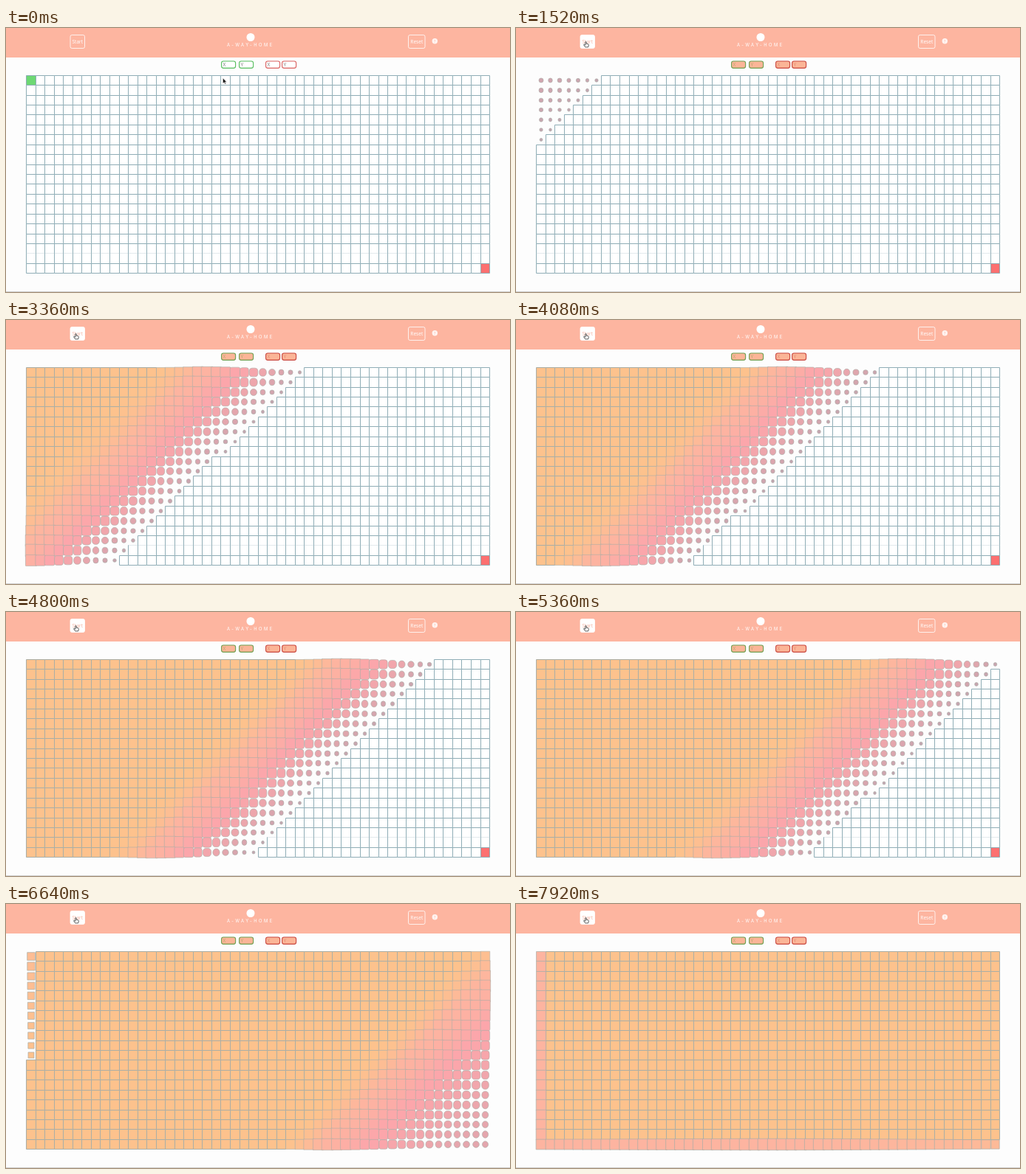
Animation, 682 px wide and 358 px high, one loop 8000 ms. Source, as an HTML page with a canvas:

```html
<!DOCTYPE html>
<html lang="en">
<head>
<meta charset="utf-8">
<title>Path finder</title>
<style>
  html, body { margin: 0; width: 100%; height: 100%; overflow: hidden; background: #fdfdfd; }
  canvas, svg { position: absolute; left: 0; top: 0; width: 682px; height: 358px; }
  text { font-family: "Open Sans", "Noto Sans", sans-serif; font-size: 6.6px; }
  .btn rect { fill: none; stroke: #fff; stroke-width: .8; }
  .btn text { fill: #fff; text-anchor: middle; }
  .hover #start rect { fill: #fff; }
  .hover #start text { fill: #f6b3a2; }
  .field rect { fill: #fff; stroke-width: 1.1; }
  .field text { fill: #777; }
  .from rect { stroke: #55bd5c; }
  .to rect { stroke: #d9605f; }
  .running .field rect { fill: #fbb597; }
  .running .from rect { stroke: #6f9f50; }
  .running .to rect { stroke: #c9473f; }
  .running .from text { fill: #b9a96c; }
  .running .to text { fill: #e08a72; }
  #hand, .hover #arrow { display: none; }
  .hover #hand { display: inline; }
</style>
</head>
<body>
<canvas id="grid"></canvas>
<svg id="ui" viewBox="0 0 682 358">
  <rect width="682" height="40" fill="#fdb5a0"/>
  <rect y="357" width="682" height="1" fill="#d2d2d2"/>
  <g id="start" class="btn">
    <rect x="87" y="9.5" width="19.5" height="18" rx="2.2"/>
    <text x="96.8" y="20.8">Start</text>
  </g>
  <g class="btn">
    <rect x="544.5" y="9.5" width="22.5" height="18" rx="2.2"/>
    <text x="555.8" y="20.8">Reset</text>
  </g>
  <circle cx="331" cy="12.5" r="5.5" fill="#fff"/>
  <text x="299" y="25.3" fill="#fff" style="font-family:Inter,sans-serif;font-size:5.8px;letter-spacing:2.5px">A-WAY-HOME</text>
  <circle cx="580.3" cy="17.8" r="3.7" fill="#fff" fill-opacity=".85"/>
  <text x="580.3" y="19.9" text-anchor="middle" fill="#fdb5a0" style="font-size:5.5px">?</text>
  <g id="fields"></g>
  <g id="cursor">
    <path id="arrow" d="M0 0V7.2L1.7 5.6L2.8 8.1L3.9 7.6L2.8 5.2H5Z" fill="#111" stroke="#fff" stroke-width=".4"/>
    <path id="hand" d="M-.6 -2.6q.7-.8 1.3 0v2.4l2.6.7q.8.3.6 1.3l-.7 2.6h-4l-2.1-3q0-.9 1-.6l1.3 1Z" fill="#fff" stroke="#333" stroke-width=".8"/>
  </g>
</svg>
<script>
const LOOP = 8000, STEP = 80, COLS = 50, ROWS = 20, LIFE = 1500;
const VISIT_START = 1385, VISIT_GAP = 4.95;
const PATH_START = 6461, PATH_GAP = 17;
const HOVER_AT = 800, RUN_AT = 1280;

const LINE = '#8fadb6', DONE_LINE = '#a9aea6';
const MAUVE = [192, 165, 176], PINK = [252, 166, 171], SALMON = [253, 180, 160], ORANGE = [253, 194, 141];

const $ = id => document.getElementById(id);
const ui = $('ui'), cursor = $('cursor'), canvas = $('grid');
const ctx = canvas.getContext('2d');
const dpr = window.devicePixelRatio || 1;
canvas.width = 682 * dpr;
canvas.height = 358 * dpr;

$('fields').innerHTML = [[291, 'X', 'from'], [315, 'Y', 'from'], [351, 'X', 'to'], [373, 'Y', 'to']]
  .map(([x, label, kind]) => `<g class="field ${kind}">
    <rect x="${x + .6}" y="45" width="19" height="9.4" rx="2.6"/>
    <text x="${x + 2.4}" y="52.2">${label}</text></g>`).join('');

const edgeX = c => Math.floor(27.6 + 12.54 * c) + .5;
const edgeY = r => Math.floor(64.3 + 13.42 * r) + .5;
const mix = (a, b, p) => a + (b - a) * p;
const rgb = (a, b, p) => `rgb(${a.map((v, i) => Math.round(mix(v, b[i], p))).join()})`;
const clamp = v => Math.max(0, Math.min(1, v));

// CSS ease-out: cubic-bezier(0, 0, .58, 1)
function easeOut(x) {
  if (x <= 0 || x >= 1) return clamp(x);
  let lo = 0, hi = 1;
  for (let i = 0; i < 16; i++) {
    const s = (lo + hi) / 2;
    if (1.74 * (1 - s) * s * s + s * s * s < x) lo = s; else hi = s;
  }
  return 3 * (1 - lo) * lo * lo + lo * lo * lo;
}
const phase = (p, from, to) => easeOut((p - from) / (to - from));

const cells = [];
for (let r = 0; r < ROWS; r++) {
  for (let c = 0; c < COLS; c++) {
    const x = edgeX(c), y = edgeY(r);
    const onPath = c === 0 || r === ROWS - 1;
    cells.push({ r, c, x, y, w: edgeX(c + 1) - x, h: edgeY(r + 1) - y,
      path: onPath ? PATH_START + (r + c) * PATH_GAP : Infinity });
  }
}
// Breadth-first order: by distance, then from the top row down
[...cells].sort((a, b) => a.r + a.c - b.r - b.c || a.r - b.r)
  .forEach((cell, i) => { cell.visit = VISIT_START + i * VISIT_GAP; });

function box(cell, fill, line, scale = 1, round = 0, width = 1) {
  const w = cell.w * scale, h = cell.h * scale;
  const x = cell.x + (cell.w - w) / 2, y = cell.y + (cell.h - h) / 2;
  const k = Math.min(round, .5);
  ctx.beginPath();
  if (k > 0) ctx.roundRect(x, y, w, h, { x: w * k, y: h * k });
  else ctx.rect(x, y, w, h);
  ctx.fillStyle = fill;
  ctx.fill();
  ctx.strokeStyle = line;
  ctx.lineWidth = width;
  ctx.stroke();
}

function drawVisit(cell, p) {
  const fill = p < .5 ? rgb(MAUVE, PINK, phase(p, 0, .5))
    : p < .75 ? rgb(PINK, SALMON, phase(p, .5, .75))
    : rgb(SALMON, ORANGE, phase(p, .75, 1));
  const grow = phase(p, 0, .75);
  const scale = p < .75 ? mix(.3, 1.2, grow) : mix(1.2, 1, phase(p, .75, 1));
  box(cell, fill, DONE_LINE, scale, 1 - grow, .6);
}

function drawPath(cell, p) {
  const grow = phase(p, 0, .5);
  const scale = p < .5 ? mix(.6, 1.2, grow) : mix(1.2, 1, phase(p, .5, 1));
  box(cell, rgb(ORANGE, SALMON, grow), DONE_LINE, scale, 0, .7);
}

function drawIdle(cell) {
  const { r, c, x, y, w } = cell;
  const fill = r + c === 0 ? '#6dd873' : r + c === ROWS + COLS - 2 ? '#fd7070' : '#fff';
  box(cell, fill, LINE);
  if (r === 18) {
    ctx.fillStyle = 'rgba(255,255,255,.75)';
    ctx.fillRect(x + .5, y - .5, w - 1, 1);
  }
}

function drawGrid(t) {
  ctx.setTransform(dpr, 0, 0, dpr, 0, 0);
  ctx.fillStyle = '#fdfdfd';
  ctx.fillRect(0, 0, 682, 358);
  const moving = [];
  for (const cell of cells) {
    if (t < cell.visit) drawIdle(cell);
    else if (t >= cell.path || t < cell.visit + LIFE) moving.push(cell);
    else box(cell, rgb(ORANGE, ORANGE, 0), DONE_LINE);
  }
  for (const cell of moving) {
    if (t >= cell.path) drawPath(cell, clamp((t - cell.path) / LIFE));
    else drawVisit(cell, (t - cell.visit) / LIFE);
  }
}

function drawUi(t) {
  const p = clamp((t - 80) / 840), s = p * p * (3 - 2 * p);
  cursor.setAttribute('transform', `translate(${mix(293.5, 94.5, s)} ${mix(68, 21.5, s)})`);
  ui.classList.toggle('hover', t >= HOVER_AT);
  ui.classList.toggle('running', t >= RUN_AT);
}

let last = -1;
function frame() {
  const t = Math.floor(performance.now() % LOOP / STEP) * STEP;
  if (t !== last) {
    last = t;
    drawGrid(t);
    drawUi(t);
  }
  requestAnimationFrame(frame);
}
frame();
</script>
</body>
</html>
```
